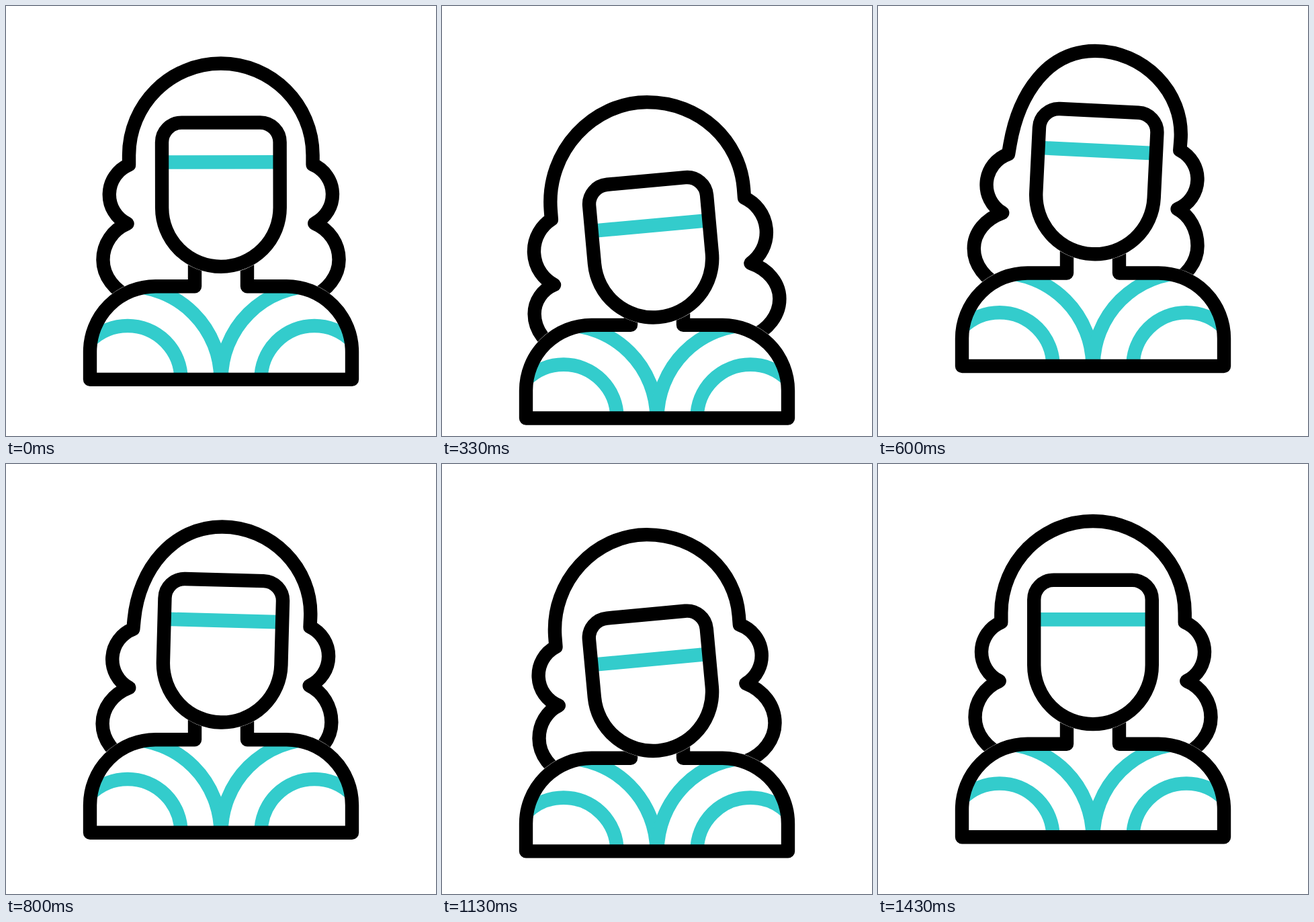
These frames come from a looping animation (640 by 640 pixels, 1.67 s). An HTML page:

```html
<!DOCTYPE html>
<html lang="en">
<head>
<meta charset="utf-8">
<title>Bouncing portrait icon</title>
<style>
  html, body { margin: 0; width: 100%; height: 100%; overflow: hidden; background: #fff; }
  svg { display: block; width: 100vw; height: 100vh; }
  .line { fill: none; stroke: #000; stroke-width: 20.4; stroke-linecap: round; stroke-linejoin: round; }
  .mask { fill: #fff; stroke: #fff; stroke-width: 21; stroke-linejoin: round; }
  .teal { fill: none; stroke: #33cccc; stroke-width: 20.6; }
</style>
</head>
<body>
<svg viewBox="0 0 640 640">
  <defs>
    <path id="torso" d="M125 555.3V514.2A97.5 97.5 0 0 1 222.5 416.7H281V350H359V416.7H417.5A97.5 97.5 0 0 1 515 514.2V555.3Z"/>
    <path id="oval"/>
    <clipPath id="inside"><use href="#torso"/></clipPath>
  </defs>
  <g id="figure">
    <path id="hair" class="line"/>
    <use href="#torso" class="mask"/>
    <g class="teal" clip-path="url(#inside)">
      <circle cx="181" cy="555" r="79.5"/>
      <circle cx="181" cy="555" r="138.5"/>
      <circle cx="459" cy="555" r="79.5"/>
      <circle cx="459" cy="555" r="138.5"/>
    </g>
    <use href="#torso" class="line"/>
    <g id="face">
      <use href="#oval" class="mask"/>
      <path id="band" class="teal" d="M232 231.4H408"/>
      <use href="#oval" class="line"/>
    </g>
  </g>
</svg>
<script>
const LOOP = 1670, FRAME = 100 / 3;
const $ = id => document.getElementById(id);
const move = (id, x, y, turn = 0) =>
  $(id).setAttribute('transform', `translate(${x} ${y}) rotate(${turn} 320 361)`);

// Key poses as [ms, value].
const bob  = [[-18, 0], [305, 59.8], [640, -22.5], [800, -6.5], [1030, 33.5], [1285, -1], [1430, 0]];
const tilt = [[-20, 0], [285, -5.6], [660, 3.4], [1130, -5.3], [1430, 0]];
const nod  = [[-20, 0], [300, 18.5], [660, 0], [1130, 18.5], [1430, 0]];
const drop = [[560, 0], [800, 15], [1130, -1], [1430, 0]];
const sag  = [[-20, 0], [310, 1], [620, 0]];

// Monotone cubic: flat at every turning point, smooth elsewhere.
function sample(keys, t) {
  const last = keys.length - 1;
  if (t <= keys[0][0]) return keys[0][1];
  if (t >= keys[last][0]) return keys[last][1];
  const rise = k => (keys[k + 1][1] - keys[k][1]) / (keys[k + 1][0] - keys[k][0]);
  const slope = k => {
    if (k === 0 || k === last) return 0;
    const a = rise(k - 1), b = rise(k);
    return a * b > 0 ? 2 * a * b / (a + b) : 0;
  };
  const i = keys.findIndex(key => key[0] > t) - 1;
  const [t0, a] = keys[i], [t1, b] = keys[i + 1];
  const d = t1 - t0, u = (t - t0) / d, v = 1 - u;
  return a * v * v * (1 + 2 * u) + b * u * u * (3 - 2 * u) + d * u * v * (slope(i) * v - slope(i + 1) * u);
}

// Both hair sides hang from the crown; the tilt leans, rolls and narrows them.
function hair(angle, fall, slack) {
  const left = Math.min(angle, 0), right = Math.max(angle, 0);
  const shift = -3.9 * right, lean = 2.9 * left + 5 * right;
  const roll = 3.1 * left - right, spread = 7 * slack - 3.3 * right;
  const tx = 320 + shift + lean, ty = 85 + fall;

  const lock = side => {
    const place = (x, y, level, turn, droop) => [
      320 + side * (x + spread) + shift + lean * level,
      y + fall + side * roll * turn + slack * droop
    ];
    const [ax, ay] = place(136.7, 235.6, .9, 1, 8);
    const [bx, by] = place(139.3, 323, .45, 1, 18);
    const [cx, cy] = place(175.5, 377, 0, .7, 12);
    const slant = .015 * left + (.045 - .016 * side) * right;
    const k = .5523, sx = ax + 14 * slant, sy = ay - 14, h = k * (sy - ty);
    const r = (((bx - ax) ** 2 + (by - ay) ** 2) / 4 + 28 * 28) / 56;
    const dx = cx - bx, dy = cy - by, ex = cx - side * 41.5, ey = cy + 56;
    return `M${tx} ${ty}C${tx + k * (sx - tx)} ${ty} ${sx + slant * h} ${sy - h} ${sx} ${sy}L${ax} ${ay}`
      + `A${r} ${r} 0 0 ${side > 0 ? 1 : 0} ${bx} ${by}`
      + `C${bx + .6 * dx} ${by + .17 * dy} ${cx} ${cy - .44 * dy} ${cx} ${cy}`
      + `C${cx} ${cy + 24.5} ${ex + side * 24} ${ey - 9.5} ${ex} ${ey}l${-side * 22} 9`;
  };
  return lock(-1) + lock(1);
}

function oval(top) {
  const y = top + 29.3;
  return `M232.2 299.3V${y}A29.3 29.3 0 0 1 261.5 ${top}H378.5A29.3 29.3 0 0 1 407.8 ${y}`
    + 'V299.3A87.8 87.8 0 0 1 232.2 299.3Z';
}

function draw(now) {
  const t = Math.floor((now % LOOP + 3.4) / FRAME) * FRAME;
  const angle = sample(tilt, t), dip = sample(nod, t);
  $('hair').setAttribute('d', hair(angle, sample(drop, t), sample(sag, t)));
  $('oval').setAttribute('d', oval(172.7 + .6 * dip));
  move('figure', 0, sample(bob, t));
  move('face', 0, dip, angle);
  move('band', 0, 1.05 * dip);
}

function tick() {
  draw(performance.now());
  requestAnimationFrame(tick);
}
tick();
</script>
</body>
</html>
```
